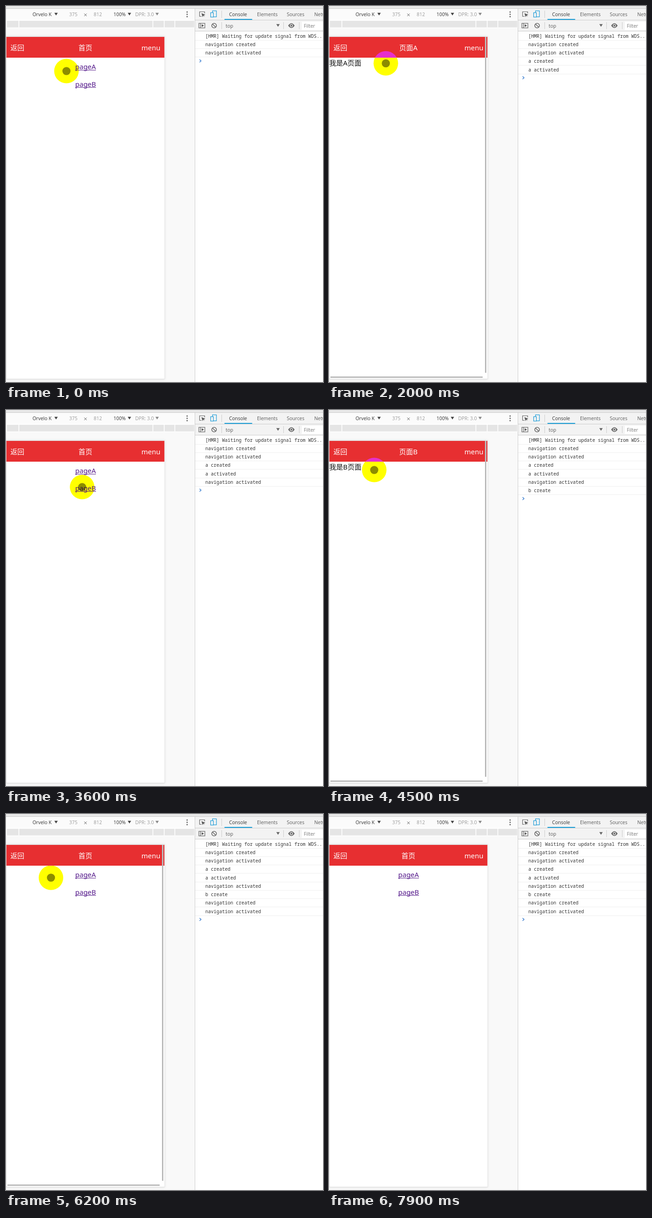
An HTML page with a canvas that plays this animation: 687x815 px, repeating every 9100 ms.

```html
<!DOCTYPE html>
<html lang="zh">
<head>
<meta charset="utf-8">
<title>Page transitions</title>
<style>
html, body { margin: 0; width: 100%; height: 100%; overflow: hidden; background: #fff; }
canvas { display: block; width: 687px; height: 815px; }
</style>
</head>
<body>
<canvas id="stage" width="687" height="815"></canvas>
<script>
const ctx = document.getElementById('stage').getContext('2d');
const LOOP = 9100, STEP = 100, SLIDE = 400, ENTER_DELAY = 26, BAR_LIFE = 450, ROW = 18.25;
const PAGE = { x: 1, y: 67, w: 342.5, h: 741 };
const UI = '10.4px "Open Sans", "Noto Sans", sans-serif';
const BODY = '15px "Noto Sans", "Noto Sans CJK SC", "Noto Sans CJK", sans-serif';
const MONO = '10.05px "Noto Sans Mono", monospace';
const DARK = '#333', MID = '#5a5a5a', ICON = '#666', PALE = '#999', RULE = '#ccc', BAR = '#f3f3f3';

const firstLogs = ['[HMR] Waiting for update signal from WDS...', 'navigation created', 'navigation activated'];

// Each slide writes its logs as it begins.
const slides = [
  { at: 1550, from: 'home', to: 'A', dir: -1, logs: ['a created', 'a activated'] },
  { at: 2750, from: 'A', to: 'home', dir: 1, logs: ['navigation activated'] },
  { at: 3750, from: 'home', to: 'B', dir: -1, logs: ['b create'] },
  { at: 5447, from: 'B', to: 'home', dir: 1, logs: ['navigation created', 'navigation activated'] }
];

// The pointer glides between spots; staying on one is a rest.
const back = [28.5, 94.5], linkA = [167, 138], linkB = [165, 167];
const stops = [
  [0, [131, 141]], [400, [117, 155]], [900, [174, 158]],
  [1300, linkA], [1700, linkA],
  [2500, back], [2700, back],
  [3500, linkB], [3800, linkB],
  [4500, [98, 130]], [5100, back], [5400, back],
  [5600, [53, 104]], [6500, [113, 150]], [7000, [191, 165.5]],
  [7300, [161, 115]], [7900, [450, 870]]
];

function rect(x, y, w, h, color) {
  ctx.fillStyle = color;
  ctx.fillRect(x, y, w, h);
}

function text(str, x, y, color, font = UI, align = 'left') {
  ctx.font = font;
  ctx.fillStyle = color;
  ctx.textAlign = align;
  ctx.fillText(str, x, y);
}

function circle(x, y, r) {
  ctx.beginPath();
  ctx.arc(x, y, r, 0, Math.PI * 2);
}

function disc(x, y, r, color) {
  ctx.fillStyle = color;
  circle(x, y, r);
  ctx.fill();
}

function ring(x, y, r, color, width) {
  ctx.strokeStyle = color;
  ctx.lineWidth = width;
  circle(x, y, r);
  ctx.stroke();
}

function trace(points) {
  ctx.beginPath();
  points.forEach(([x, y]) => ctx.lineTo(x, y));
}

function shape(points, color) {
  ctx.fillStyle = color;
  trace(points);
  ctx.fill();
}

function line(points, color, width = 1) {
  ctx.strokeStyle = color;
  ctx.lineWidth = width;
  trace(points);
  ctx.stroke();
}

function box(x, y, w, h, color) {
  ctx.strokeStyle = color;
  ctx.lineWidth = 1.2;
  ctx.strokeRect(x, y, w, h);
}

function arrowDown(x, y, color) {
  shape([[x - 3.7, y - 2.7], [x + 3.7, y - 2.7], [x, y + 3]], color);
}

const mix = (a, b, p) => a + (b - a) * p;
const smooth = p => p * p * (3 - 2 * p);

// CSS "ease": cubic-bezier(.25, .1, .25, 1)
function ease(p) {
  if (p <= 0) return 0;
  if (p >= 1) return 1;
  const bez = (s, a, b) => 3 * (1 - s) * (1 - s) * s * a + 3 * (1 - s) * s * s * b + s * s * s;
  let lo = 0, hi = 1;
  for (let i = 0; i < 24; i++) {
    const mid = (lo + hi) / 2;
    if (bez(mid, .25, .25) < p) lo = mid; else hi = mid;
  }
  return bez(lo, .1, 1);
}

function drawDeviceBar() {
  rect(0, 0, 687, 815, '#f9f9f9');
  rect(0, 0, 687, 5, '#e9e9e9');
  rect(0, 5, 687, 1, '#c9c9c9');
  rect(0, 6, 409, 24, '#fbfbfb');
  rect(0, 30, 409, 18, '#fff');
  rect(2, 32, 406, 14.5, '#e5e5e5');
  [27, 317.5, 342, 365].forEach(x => rect(x, 32, 1.7, 14.5, '#fff'));

  text('Orvelo K', 57.5, 22, DARK);
  arrowDown(108.5, 17.5, '#444');
  text('375', 137, 22, PALE);
  line([[169.5, 16.5], [175, 22]], MID);
  line([[175, 16.5], [169.5, 22]], MID);
  text('812', 190, 22, PALE);
  text('100%', 233, 22, DARK);
  arrowDown(267.5, 17.5, '#444');
  text('DPR: 3.0', 280, 22, PALE);
  arrowDown(327.5, 17.5, '#888');
  for (let y = 13; y < 25; y += 5) disc(392.5, y, 1.5, ICON);
}

function drawTabs() {
  line([[424, 22.5], [419.5, 22.5], [419.5, 12.5], [430.5, 12.5], [430.5, 16]], ICON, 1.2);
  shape([[423.5, 15.5], [432, 19], [428.5, 20.5], [431, 23.5], [427.5, 21], [426, 24]], MID);
  box(447.5, 10.5, 8.5, 13, '#1a9bd8');
  rect(443, 14, 7, 11, BAR);
  box(443.5, 14.5, 6, 9.5, '#1a9bd8');
  rect(467, 10, 1, 16, RULE);
  text('Console', 483.5, 22, DARK);
  text('Elements', 544, 22, MID);
  text('Sources', 608.5, 22, MID);
  text('Network', 668, 22, MID);
  rect(473.5, 28, 60, 2, '#1a9fd9');
}

function drawFilterBar() {
  box(418, 37.5, 13, 10, ICON);
  line([[421.5, 38], [421.5, 47]], ICON, 1.2);
  shape([[424, 39.5], [429, 42.5], [424, 45.5]], MID);
  ring(451, 42.5, 5, ICON, 1.6);
  line([[447.5, 39], [454.5, 46]], ICON, 1.6);
  [467, 601, 635].forEach(x => rect(x, 35, 1, 15, RULE));
  text('top', 476, 46.5, MID);
  arrowDown(589.5, 42, ICON);

  ctx.fillStyle = ICON;
  ctx.beginPath();
  ctx.moveTo(611.5, 42.5);
  ctx.quadraticCurveTo(618.5, 32.5, 625.5, 42.5);
  ctx.quadraticCurveTo(618.5, 52.5, 611.5, 42.5);
  ctx.fill();
  disc(618.5, 42.5, 3.2, BAR);
  disc(618.5, 42.5, 2, ICON);
  rect(641, 34, 46, 18, '#fff');
  text('Filter', 645.5, 46.5, '#777');
}

function drawPanel() {
  rect(409, 6, 1, 809, RULE);
  rect(410, 6, 277, 49, BAR);
  rect(410, 55, 277, 760, '#fff');
  rect(410, 30, 277, 1, RULE);
  rect(410, 54, 277, 1, RULE);
  drawTabs();
  drawFilterBar();
}

function drawLogs(t) {
  const shown = firstLogs.concat(...slides.filter(s => t >= s.at).map(s => s.logs));
  shown.forEach((str, i) => {
    const y = 65 + i * ROW;
    text(str, 432, y + 3.5, DARK, MONO);
    rect(410, Math.round(y + 8.6), 277, 1, '#efefef');
  });
  const y = 64.2 + shown.length * ROW;
  line([[419.5, y - 3], [422.7, y], [419.5, y + 3]], '#3c7fd0', 1.5);
}

function link(str, x, y) {
  text(str, x, y, '#551a8b', BODY);
  rect(x, y + 1.6, ctx.measureText(str).width, 1, '#551a8b');
}

function drawPage(name, dx) {
  const home = name === 'home';
  ctx.save();
  ctx.translate(dx, 0);
  rect(PAGE.x, PAGE.y, PAGE.w, 45, '#e72f31');
  text('返回', 9.5, 96, '#fff', BODY);
  text(home ? '首页' : '页面' + name, 172, 96, '#fff', BODY, 'center');
  text('menu', 334.5, 96, '#fff', BODY, 'right');
  if (home) {
    link('pageA', 150, 137);
    link('pageB', 150, 174.5);
  } else {
    text('我是' + name + '页面', 0.5, 128.5, '#111', BODY);
  }
  ctx.restore();
}

function drawSlide({ at, from, to, dir }, t) {
  const age = t - at;
  const out = ease(age / SLIDE), into = ease((age - ENTER_DELAY) / SLIDE);
  if (out < 1) drawPage(from, dir * out * 343);
  drawPage(to, -dir * (1 - into) * 343);
  if (age >= SLIDE && age < SLIDE + BAR_LIFE) {
    rect(338, 67, 3, 728, '#bababa');
    rect(3, 803, 330, 3, '#bababa');
  }
}

function drawPhone(t) {
  ctx.save();
  ctx.shadowColor = 'rgba(0,0,0,.12)';
  ctx.shadowBlur = 5;
  rect(0, 66, 344, 743, '#dedede');
  ctx.restore();
  rect(PAGE.x, PAGE.y, PAGE.w, PAGE.h, '#fff');

  ctx.save();
  ctx.beginPath();
  ctx.rect(PAGE.x, PAGE.y, PAGE.w, PAGE.h);
  ctx.clip();
  const slide = slides.filter(s => t >= s.at).pop();
  if (slide) drawSlide(slide, t); else drawPage('home', 0);
  ctx.restore();
}

function drawCursor(t) {
  const next = stops.findIndex(([at]) => at > t);
  if (next < 0) return;
  const [t0, a] = stops[next - 1], [t1, b] = stops[next];
  const p = smooth((t - t0) / (t1 - t0));
  const x = mix(a[0], b[0], p), y = mix(a[1], b[1], p);

  ctx.globalCompositeOperation = 'difference';
  disc(x, y, 26.6, '#00f');
  ctx.globalCompositeOperation = 'source-over';

  // A press on the back button shows just before and after its slide begins.
  const press = slides.some(s => s.dir > 0 && Math.abs(t - s.at) < 160);
  disc(x, y, 8.8, 'rgba(0,0,0,.45)');
  if (press) ring(x, y, 9, 'rgba(255,150,225,.85)', 1.5);
}

function draw(now) {
  const t = Math.floor((now % LOOP) / STEP) * STEP;
  drawDeviceBar();
  drawPhone(t);
  drawPanel();
  drawLogs(t);
  drawCursor(t);
}

let start;
function tick(now) {
  if (start === undefined) start = now;
  draw(now - start);
  requestAnimationFrame(tick);
}
draw(0);
requestAnimationFrame(tick);
</script>
</body>
</html>
```
